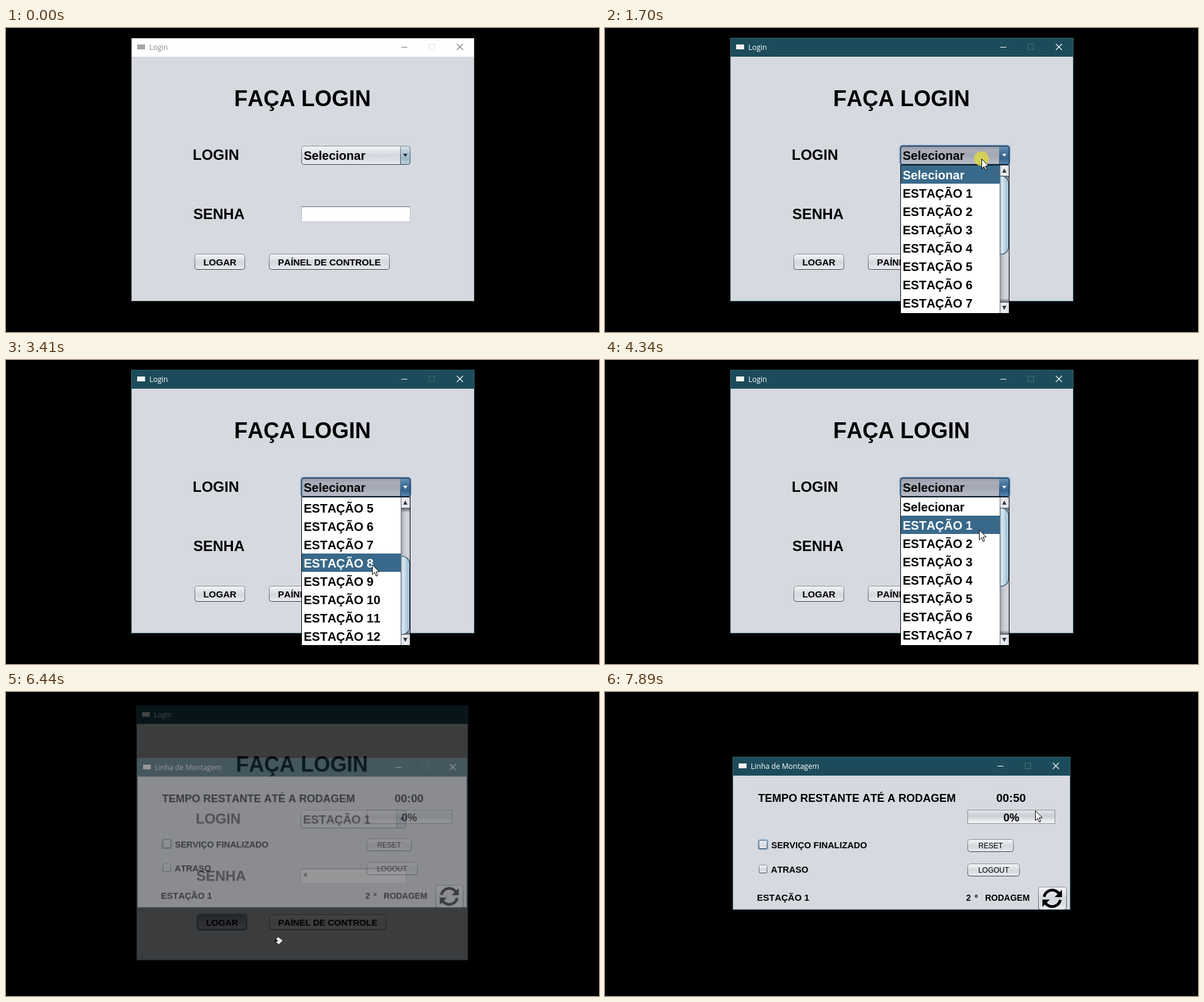
Write an HTML page with a canvas that moves like this. It is 972 by 498 pixels and loops after 7.99 s.

```html
<!DOCTYPE html>
<html lang="pt">
<head>
<meta charset="utf-8">
<title>Login</title>
<style>
html, body { margin: 0; width: 100%; height: 100%; overflow: hidden; background: #000; }
canvas { display: block; }
</style>
</head>
<body>
<canvas id="stage" width="972" height="498"></canvas>
<script>
const stage = document.getElementById('stage').getContext('2d');
const layer = document.createElement('canvas');
layer.width = 972;
layer.height = 498;
const layerCtx = layer.getContext('2d');
let c = stage;

const LOOP = 7990, STEP = 77.4;
const BODY = '#d6d9df', TEAL = '#1c4c5b', SELECT = '#39698a';
const FACE = ['#f5f6f8', '#e6e8ec', '#d5d8de', '#dddfe5', '#f0f1f4'];
const FACE_HOVER = ['#ffffff', '#f4f6f9', '#e6eaf0', '#eceff4', '#fcfdff'];
const FACE_DOWN = ['#7f8591', '#9ba0ac', '#a4a9b5', '#adb3bf', '#bcc2cf'];
const FACE_OPEN = ['#9298a5', '#a9aeb9', '#a2a7b3', '#aeb3be', '#b9bfcb'];
const EDGE = ['#8d929a', '#737982', '#3a414b'];
const ITEMS = ['Selecionar', ...Array.from({ length: 12 }, (_, i) => 'ESTAÇÃO ' + (i + 1))];
const CLICKS = [22, 60, 61, 65, 78];

const RECT = {
  combo: [484, 193, 179, 31], field: [484, 292, 179, 26],
  enter: [309, 370, 83, 26], panel: [431, 370, 198, 26],
  reset: [594, 241, 76, 21], logout: [594, 281, 86, 21], refresh: [710, 319, 47, 38]
};

// Pointer stops: step, x, y
const PATH = [
  [8, 947, 474], [13, 750, 326], [18, 621, 225], [20, 617, 214], [25, 617, 214],
  [28, 650, 262], [30, 667, 310], [33, 610, 335], [40, 610, 335], [41, 606, 334],
  [42, 606, 334], [44, 600, 335], [47, 598, 366], [52, 598, 366], [56, 613, 278],
  [58, 606, 272], [62, 606, 272], [65, 575, 303], [68, 575, 303], [72, 455, 380],
  [75, 372, 388], [76, 368, 389], [79, 368, 389], [83, 440, 401], [86, 480, 429],
  [94, 640, 316], [97, 652, 290], [99, 668, 255], [102, 705, 194]
];

function pointerAt(n) {
  const i = PATH.findIndex(p => p[0] >= n);
  if (i < 0) return PATH[PATH.length - 1].slice(1);
  if (i === 0) return PATH[0].slice(1);
  const [n0, x0, y0] = PATH[i - 1], [n1, x1, y1] = PATH[i];
  const k = (n - n0) / (n1 - n0);
  return [Math.round(x0 + (x1 - x0) * k), Math.round(y0 + (y1 - y0) * k)];
}

const inside = ([px, py], [x, y, w, h]) => px >= x && px < x + w && py >= y && py < y + h;

function blend(x0, y0, x1, y1, colors) {
  const g = c.createLinearGradient(x0, y0, x1, y1);
  colors.forEach((color, i) => g.addColorStop(i / (colors.length - 1), color));
  return g;
}

function rect(color, x, y, w, h) {
  c.fillStyle = color;
  c.fillRect(x, y, w, h);
}

function text(str, x, y, size, color = '#000', weight = 'bold', align = 'left') {
  c.font = `${weight} ${size}px "Liberation Sans", Arial, sans-serif`;
  c.fontKerning = 'none';
  c.textAlign = align;
  c.fillStyle = color;
  c.fillText(str, x, y);
}

function poly(points, fill, stroke, width = 1) {
  c.beginPath();
  points.forEach(([x, y]) => c.lineTo(x, y));
  if (fill) { c.closePath(); c.fillStyle = fill; c.fill(); }
  if (stroke) { c.strokeStyle = stroke; c.lineWidth = width; c.stroke(); }
}

function rounded(x, y, w, h, r, fill, stroke, width = 1) {
  c.beginPath();
  c.roundRect(x, y, w, h, r);
  if (fill) { c.fillStyle = fill; c.fill(); }
  if (stroke) { c.strokeStyle = stroke; c.lineWidth = width; c.stroke(); }
}

function focusRing([x, y, w, h], r = 4) {
  rounded(x - .5, y - .5, w + 1, h + 1, r, null, '#78a3cb', 2);
}

function face([x, y, w, h], colors = FACE, r = 4) {
  rounded(x + .5, y + .5, w - 1, h - 1, r,
    blend(0, y, 0, y + h, colors), blend(0, y, 0, y + h, EDGE));
}

function button(box, label, size, weight, baseline, hover) {
  face(box, hover ? FACE_HOVER : FACE);
  text(label, box[0] + box[2] / 2, baseline, size, '#000', weight, 'center');
}

function frameWindow(x, y, w, h, title, active, controls = true) {
  rect(active ? '#315b67' : '#454545', x, y, w, h);
  rect(BODY, x + 1, y + 31, w - 2, h - 32);
  rect(active ? TEAL : '#fff', x + 1, y + 1, w - 2, 30);
  rect(active ? '#f4f4f0' : '#a2a5a2', x + 10, y + 11, 13, 8);
  c.font = '12px "Open Sans", "Noto Sans", sans-serif';
  c.textAlign = 'left';
  c.fillStyle = active ? '#fff' : '#8c8c8c';
  c.fillText(title, x + 30, y + 20);
  if (!controls) return;
  const ink = active ? '#fff' : '#777', r = x + w;
  rect(ink, r - 120, y + 15, 10, 1);
  c.lineWidth = 1;
  c.strokeStyle = active ? '#466d79' : '#e2e2e2';
  c.strokeRect(r - 74.5, y + 10.5, 9, 9);
  poly([[r - 29, y + 10], [r - 19, y + 20]], null, ink, 1.1);
  poly([[r - 19, y + 10], [r - 29, y + 20]], null, ink, 1.1);
}

function drawCombo(n, pos) {
  const box = RECT.combo, [x, y, w, h] = box;
  const open = n >= 22 && n < 62;
  if (n >= 22 && n < 65) focusRing(box);
  face(box, open ? FACE_OPEN : inside(pos, box) && n > 7 ? FACE_HOVER : FACE);
  const tint = open ? ['#6d96b8', '#45749c', '#34628c', '#5c8fb8']
    : ['#dce5eb', '#b4c7d3', '#9fb7c6', '#c4d7e2'];
  rounded(x + 162.5, y + .5, 16, h - 1, [0, 4, 4, 0],
    blend(0, y, 0, y + h, tint), blend(0, y, 0, y + h, ['#7891a2', '#536f82', '#2e4656']));
  if (open) rounded(x + .5, y + .5, w - 1, h - 1, 4, null, '#18304e', 1.3);
  poly([[651, 206], [658, 206], [654.5, 211]], open ? '#fff' : '#20262c');
  text(ITEMS[n < 62 ? 0 : 1], 488, 216, 20);
}

function drawField(n) {
  const [x, y, w, h] = RECT.field;
  const focused = n >= 65 && n < 80;
  if (focused) focusRing(RECT.field, 1);
  rect('#b9bcc2', x, y, w, h);
  rect('#fff', x + 1, y + 1, w - 2, h - 2);
  rect('#85878b', x, y, w, 1);
  rect('#d4d5d8', x + 1, y + 1, w - 2, 1);
  if (n >= 68) text('*', 488, 313, 20, '#000', 'normal');
  if (focused) rect('#000', n >= 68 ? 496 : 489, 297, 1, 17);
}

function drawLogin(n, pos) {
  frameWindow(205, 16, 563, 432, 'Login', n >= 22, n < 82);
  text('FAÇA LOGIN', 374, 128, 36);
  text('LOGIN', 306, 216, 24);
  text('SENHA', 307, 313, 24);
  drawCombo(n, pos);
  drawField(n);
  if (n >= 80) focusRing(RECT.enter);
  button(RECT.enter, 'LOGAR', 15, 'bold', 389, inside(pos, RECT.enter));
  if (n === 78 || n >= 82) {
    face(RECT.enter, FACE_DOWN);
    text('LOGAR', 350.5, 389, 15, '#000', 'bold', 'center');
  }
  button(RECT.panel, 'PAÍNEL DE CONTROLE', 15, 'bold', 389, inside(pos, RECT.panel));
}

const scrollAt = n => n < 35 || n >= 49 ? 0 : Math.min(148, (n - 34) * 50);

function hotRow(n) {
  // The highlight stays on its row while the wheel turns.
  const at = n < 41 ? Math.min(n, 33) : n < 53 ? Math.min(n, 48) : n;
  return Math.max(0, Math.floor((pointerAt(at)[1] - 225 + scrollAt(at)) / 30));
}

function drawScrollbar(scroll) {
  rect(blend(647, 0, 662, 0, ['#9a9fa8', '#c0c5cc', '#d3d7dc', '#c6cad0']), 647, 225, 15, 242);
  rect(blend(0, 242, 0, 250, ['rgba(50,55,62,.75)', 'rgba(50,55,62,0)']), 647, 242, 15, 8);
  rect(blend(0, 443, 0, 450, ['rgba(50,55,62,0)', 'rgba(50,55,62,.75)']), 647, 443, 15, 7);
  for (const y of [225, 450]) rect(blend(647, 0, 662, 0, ['#d9dce1', '#eff1f4', '#d5d9df']), 647, y, 15, 17);
  poly([[651, 237], [658, 237], [654.5, 230]], '#33383f');
  poly([[651, 455], [658, 455], [654.5, 462]], '#33383f');
  const y = 242 + scroll * 79 / 148;
  rounded(647.5, y + .5, 14, 128, [0, 12, 12, 0],
    blend(647, 0, 662, 0, ['#9db9cd', '#d9e8f2', '#c3d8e6', '#a5c1d4', '#c9dfec']), '#2d4961', 1.2);
  rect('#6d7781', 647, 225, 1, 242);
}

function drawPopup(n) {
  const scroll = scrollAt(n), hot = hotRow(n);
  rect('#000', 484, 224, 179, 243);
  rect('#fff', 485, 225, 162, 242);
  c.save();
  c.beginPath();
  c.rect(485, 225, 162, 242);
  c.clip();
  ITEMS.forEach((item, i) => {
    const y = 225 + i * 30 - scroll;
    if (i === hot) rect(SELECT, 485, y, 162, 30);
    text(item, 488, y + 23, 20, i === hot ? '#fff' : '#000');
  });
  c.restore();
  drawScrollbar(scroll);
}

function drawRefresh() {
  face(RECT.refresh);
  c.save();
  c.translate(733, 338);
  for (let i = 0; i < 2; i++) {
    c.beginPath();
    c.arc(0, 0, 13.5, Math.PI * 1.06, Math.PI * 1.82);
    c.strokeStyle = '#000';
    c.lineWidth = 4.5;
    c.stroke();
    poly([[16, -14], [16, -2], [4, -2]], '#000');
    c.rotate(Math.PI);
  }
  c.restore();
}

function drawAssembly(n, pos) {
  frameWindow(209, 106, 554, 251, 'Linha de Montagem', true);
  text('TEMPO RESTANTE ATÉ A RODAGEM', 251, 180, 18);
  text(n < 85 ? '00:00' : '00:50', 665.5, 180, 19, '#000', 'bold', 'center');
  rect('#8c9097', 594, 193, 144, 23);
  rect(blend(0, 194, 0, 215, ['#e6e8ec', '#d2d5db', '#cdd0d7', '#e6e8ec', '#f3f4f6']), 595, 194, 142, 21);
  text('0%', 666, 212, 18, '#000', 'bold', 'center');
  focusRing([252, 243, 14, 14], 3);
  face([252, 243, 14, 14], FACE, 2);
  face([252, 283, 14, 14], FACE, 2);
  text('SERVIÇO FINALIZADO', 272.5, 256, 14.5);
  text('ATRASO', 272, 296, 14.5);
  button(RECT.reset, 'RESET', 12, 'normal', 256, inside(pos, RECT.reset));
  button(RECT.logout, 'LOGOUT', 12, 'normal', 296, inside(pos, RECT.logout));
  text('ESTAÇÃO 1', 249, 342, 15);
  text('2', 592, 342, 14);
  text('º', 606, 342, 14);
  text('RODAGEM', 623, 342, 14);
  drawRefresh();
  rect('#315b67', 209, 356, 554, 1);
}

// Paints a window on its own layer so that it fades and scales as a whole.
function fade(draw, alpha, scale, cx, cy) {
  c = layerCtx;
  c.clearRect(0, 0, 972, 498);
  draw();
  c = stage;
  c.save();
  c.globalAlpha = alpha;
  const drift = (1 - scale) * 30;
  c.translate(cx - drift, cy - drift);
  c.scale(scale, scale);
  c.drawImage(layer, -cx, -cy);
  c.restore();
}

function drawPointer(n, pos) {
  const [x, y] = pos;
  if (CLICKS.includes(n)) {
    c.beginPath();
    c.arc(x, y, 12, 0, Math.PI * 2);
    c.fillStyle = 'rgba(218,215,70,.85)';
    c.fill();
  }
  c.save();
  c.translate(x, y);
  if (n >= 82 && n < 85) {
    poly([[0, 6], [6, 0], [14, 6], [7, 13]], '#e4e4e4', '#333');
    poly([[-1, 9], [2, 3], [6, 7]], '#151515');
  } else if (n >= 63 && n < 80 && inside(pos, RECT.field)) {
    rect('#000', 0, -8, 1, 17);
    rect('#000', -3, -8, 7, 1);
    rect('#000', -3, 8, 7, 1);
  } else {
    poly([[.5, .5], [.5, 16.5], [4.2, 13], [6.8, 19], [9.2, 18], [6.7, 12], [11.8, 12], [.5, .5]], '#fff', '#000');
  }
  c.restore();
}

function render(time) {
  const n = Math.floor((time % LOOP + 20) / STEP);
  const pos = pointerAt(n);
  rect('#000', 0, 0, 972, 498);
  const login = () => drawLogin(n, pos), assembly = () => drawAssembly(n, pos);
  if (n < 82) login();
  else if (n === 82) fade(login, .8, .99, 486.5, 232);
  else if (n < 85) {
    const first = n === 83;
    fade(assembly, first ? .51 : .92, first ? .9765 : .996, 486, 231.5);
    fade(login, first ? .275 : .04, first ? .9665 : .945, 486.5, 232);
  } else assembly();
  if (n >= 22 && n < 62) drawPopup(n);
  if (n >= 8) drawPointer(n, pos);
}

const start = performance.now();
function tick() {
  render(performance.now() - start);
  requestAnimationFrame(tick);
}
tick();
</script>
</body>
</html>
```
